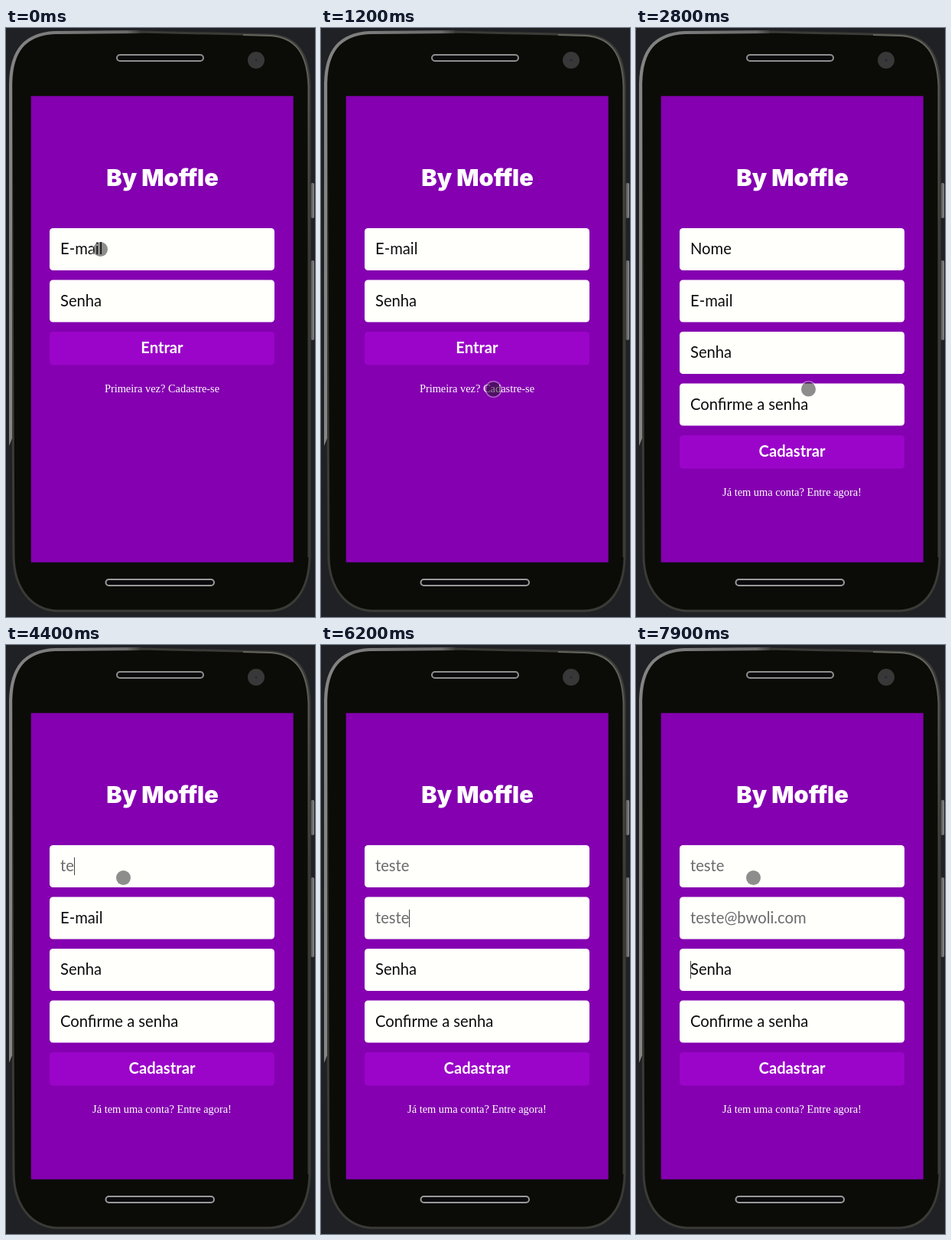
An HTML page that plays this animation: 404x768 px, repeating every 8 s.

```html
<!DOCTYPE html>
<html lang="pt">
<head>
<meta charset="utf-8">
<title>Cadastro</title>
<style>
  html, body { margin: 0; width: 100%; height: 100%; overflow: hidden; background: #202125; }
  svg { display: block; width: 404px; height: 768px; }
  text { font-family: Lato, "Open Sans", sans-serif; font-size: 20.2px; }
  .title { font: 900 30.6px Inter, sans-serif; fill: #fff; text-anchor: middle; }
  .button { font-weight: 700; fill: #fff; text-anchor: middle; }
  .link { font: 14.4px "Liberation Serif", serif; fill: #fff; text-anchor: middle; }
</style>
</head>
<body>
<svg viewBox="0 0 404 768" xmlns="http://www.w3.org/2000/svg">
  <defs>
    <linearGradient id="shine" gradientUnits="userSpaceOnUse" x1="0" y1="0" x2="175" y2="0">
      <stop offset="0" stop-color="#858585"/>
      <stop offset=".9" stop-color="#6c6c6c"/>
      <stop offset="1" stop-color="#3c3c3a"/>
    </linearGradient>
    <linearGradient id="rim" gradientUnits="userSpaceOnUse" x1="0" y1="0" x2="0" y2="300">
      <stop offset="0" stop-color="#66665f"/>
      <stop offset="1" stop-color="#3a3b36"/>
    </linearGradient>
    <linearGradient id="key" x1="0" x2="1">
      <stop offset="0" stop-color="#555"/>
      <stop offset="1" stop-color="#898989"/>
    </linearGradient>
  </defs>

  <rect width="404" height="768" fill="#202125"/>
  <rect x="398.5" y="202" width="4.5" height="46" rx="2" fill="url(#key)"/>
  <rect x="398.5" y="303" width="4.5" height="104" rx="2" fill="url(#key)"/>
  <path id="body" d="M7 72C8 30 24 8 64 6L175 5L345 9C380 11 396 32 397 76L397 690C396 735 375 759 345 760L65 760C30 757 11 728 10 690Z"
    fill="#0b0c07" stroke="#3a3b36" stroke-width="3"/>
  <path d="M4 510H8V535L4 545Z" fill="#858585"/>
  <path d="M6 512V72C7 30 24 8 64 6L175 5" fill="none" stroke="url(#shine)" stroke-width="4"/>
  <path d="M310 9L345 10C378 12 394 32 395.5 76V690" fill="none" stroke="url(#rim)" stroke-width="2"/>
  <rect x="145" y="35" width="113" height="8" rx="4" fill="#0b0b0e" stroke="#8e8e8e" stroke-width="2"/>
  <rect x="130.5" y="719" width="141.5" height="8" rx="4" fill="#0b0b0e" stroke="#999" stroke-width="2"/>
  <circle cx="327" cy="42" r="11" fill="#383838"/>
  <circle cx="327" cy="42" r="1.5" fill="#2a2440"/>

  <rect x="32.7" y="88.7" width="343" height="608" fill="#8400b0"/>
  <text class="title" x="204.5" y="205.5">By Moffle</text>

  <g id="fields"></g>
  <rect id="button" x="57" width="294" height="43.5" rx="4.5" fill="#9b05c9"/>
  <text id="buttonText" class="button" x="204"></text>
  <text id="link" class="link" x="204"></text>
  <rect id="caret" width="1" height="23" fill="#444"/>

  <g id="touch">
    <circle r="10.3" fill="none" stroke="#fff" stroke-opacity=".4" stroke-width="1.6"/>
    <circle r="9.5" fill="#1c1c1c" fill-opacity=".5"/>
  </g>
  <path id="arrow" d="M225 469.5V486L228.7 482.5L231.3 488.2L234 487L231.5 481.3H236.3Z"
    fill="#222" stroke="#fff"/>
</svg>

<script>
const LOOP = 8000;
const TICK = 100;
const SIGNUP = 2800;
const FIELD_TOP = 261;
const ROW = 67.5;
const LEFT = 71;
const LOGIN_LABELS = ["E-mail", "Senha"];
const SIGNUP_LABELS = ["Nome", "E-mail", "Senha", "Confirme a senha"];

const $ = id => document.getElementById(id);
const within = (t, from, to) => t >= from && t < to;
const clamp = p => Math.min(1, Math.max(0, p));
const bezier = (a, b, c, p) => (1 - p) ** 2 * a + 2 * p * (1 - p) * b + p * p * c;

function set(node, attrs) {
  for (const name in attrs) node.setAttribute(name, attrs[name]);
}

function show(node, visible) {
  set(node, { visibility: visible ? "visible" : "hidden" });
}

function add(tag, attrs) {
  const node = document.createElementNS("http://www.w3.org/2000/svg", tag);
  set(node, attrs);
  return $("fields").appendChild(node);
}

const rows = SIGNUP_LABELS.map((_, i) => {
  const y = FIELD_TOP + i * ROW;
  return {
    box: add("rect", { x: 57, y, width: 294, height: 55, rx: 4.5, fill: "#fffffc" }),
    label: add("text", { x: LEFT, y: y + 34 })
  };
});

// Types text at a steady pace, with `first` letters already there at `from`
function type(text, t, from, to, first = 1) {
  if (t < from) return "";
  const pace = (text.length - first) / (to - from);
  return text.slice(0, Math.floor(first + pace * (t - from) + 0.01));
}

function typedTexts(t) {
  const name = type("teste", t, 4400, 4900, 2);
  const email = type("teste", t, 5500, 6100, 1.5)
    + (t >= 6400 ? "@" : "")
    + type("bwoli", t, 6900, 7600, 1.5)
    + (t >= 7800 ? ".com" : "");
  return [name, email];
}

// The pointer is sampled once per tick, so each move advances in steps
function touchPoint(t) {
  let point = { x: 123.5, y: 288.5 };
  const move = (from, to, x, y, viaX = x, viaY = y) => {
    const p = clamp((Math.floor((t - from) / TICK) + 1) * TICK / (to - from + TICK));
    point = { x: bezier(point.x, viaX, x, p), y: bezier(point.y, viaY, y, p) };
  };
  move(100, 100, 120.5, 288.5);
  move(400, 700, 200, 477, 180, 350);
  move(1000, 1200, 225.5, 471, 250, 506);
  move(3300, 3300, 153.5, 303.5);
  return point;
}

function renderForm(t, typed) {
  const signup = t >= SIGNUP;
  const labels = signup ? SIGNUP_LABELS : LOGIN_LABELS;
  rows.forEach(({ box, label }, i) => {
    show(box, i < labels.length);
    label.textContent = typed[i] || labels[i] || "";
    set(label, { fill: typed[i] ? "#6a6a6a" : "#0c0c0c" });
  });

  const end = FIELD_TOP + labels.length * ROW;
  set($("button"), { y: end });
  set($("buttonText"), { y: end + 28.3 });
  set($("link"), { y: end + 79 });
  $("buttonText").textContent = signup ? "Cadastrar" : "Entrar";
  $("link").textContent = signup ? "Já tem uma conta? Entre agora!" : "Primeira vez? Cadastre-se";
}

function renderCaret(t, typed) {
  const row = t < 5100 ? 0 : t < 7900 ? 1 : 2;
  const blinkedOff = within(t, 4100, 4400) || within(t, 6800, 6900);
  const width = typed[row] ? rows[row].label.getComputedTextLength() : 0;
  show($("caret"), t >= 3600 && !blinkedOff);
  set($("caret"), { x: Math.round(LEFT + width), y: Math.round(FIELD_TOP + 16 + row * ROW) });
}

function renderPointer(t) {
  const arrow = within(t, 2700, SIGNUP);
  const { x, y } = touchPoint(t);
  set($("touch"), { transform: `translate(${x} ${y})` });
  show($("touch"), !arrow && !within(t, 6200, 6500));
  show($("arrow"), arrow);
}

function render(t) {
  const typed = typedTexts(t);
  renderForm(t, typed);
  renderCaret(t, typed);
  renderPointer(t);
}

const start = performance.now();
function tick() {
  render((performance.now() - start) % LOOP);
  requestAnimationFrame(tick);
}
tick();
</script>
</body>
</html>
```
